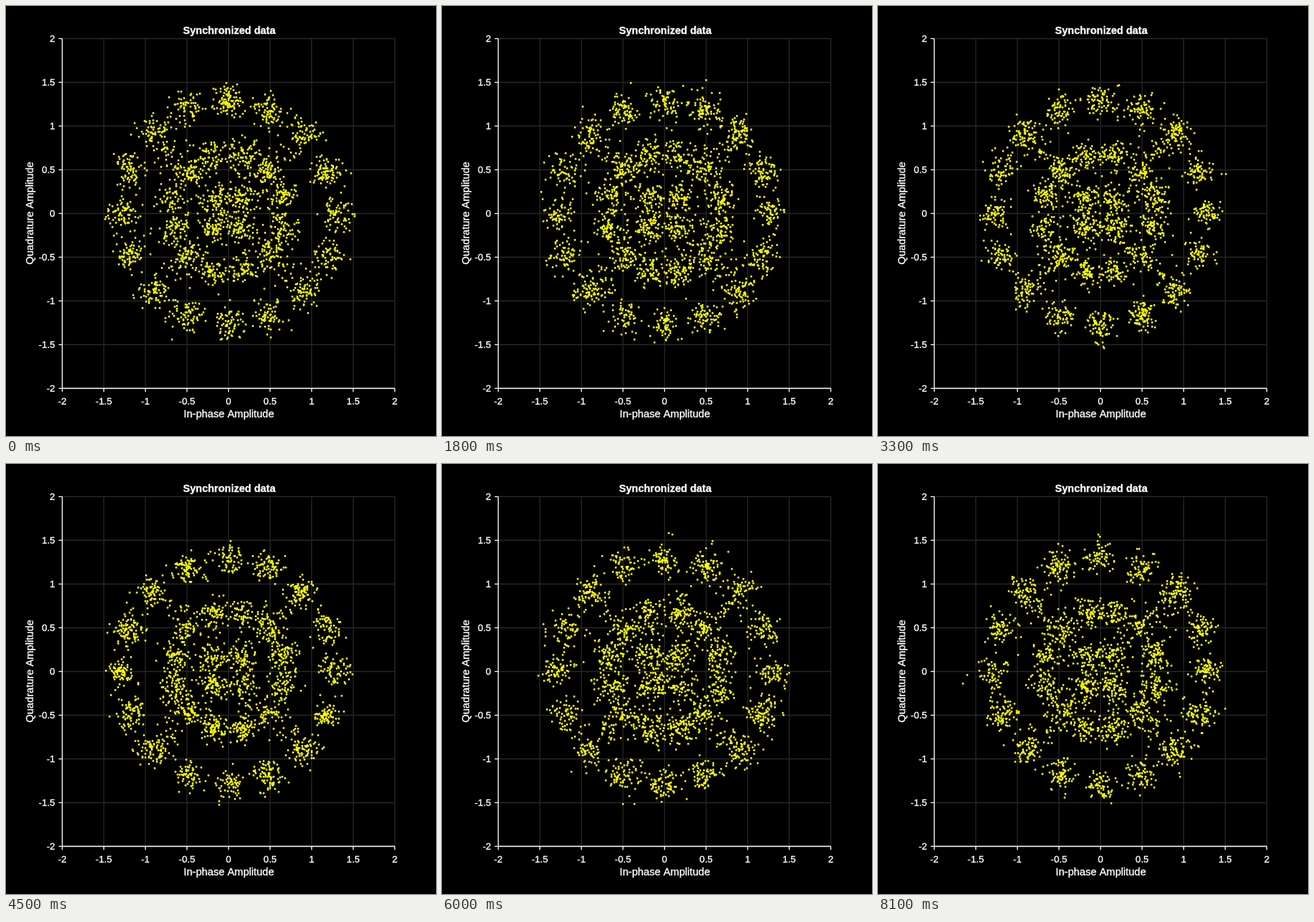
An HTML page with a canvas for the animation above (8.4 s loop, 600 by 600 pixels).

```html
<!DOCTYPE html>
<html lang="en">
<head>
<meta charset="utf-8">
<title>Synchronized data</title>
<style>
html, body { margin: 0; width: 100%; height: 100%; overflow: hidden; background: #000; }
canvas { display: block; }
</style>
</head>
<body>
<canvas id="stage" width="600" height="600"></canvas>
<script>
const ctx = document.getElementById('stage').getContext('2d');
const FRAME_MS = 300, FRAMES = 28, SYMBOLS = 2450, DOT = 1.4;
const RINGS = [[4, 0.235, 45], [12, 0.68, 15], [16, 1.28, 0]];
const toX = v => 310.4 + v * 116;
const toY = v => 289.3 - v * 122;
const snap = v => Math.floor(v) + 0.5;

const points = RINGS.flatMap(([count, radius, offset]) =>
  Array.from({ length: count }, (_, i) => {
    const angle = (offset + i * 360 / count) * Math.PI / 180;
    return [radius * Math.cos(angle), radius * Math.sin(angle)];
  }));

function seeded(seed) {
  return () => {
    seed = (seed + 0x6D2B79F5) | 0;
    let t = Math.imul(seed ^ (seed >>> 15), 1 | seed);
    t = (t + Math.imul(t ^ (t >>> 7), 61 | t)) ^ t;
    return ((t ^ (t >>> 14)) >>> 0) / 4294967296;
  };
}

function label(text, x, y, size = 13.33, align = 'center', weight = 'normal') {
  ctx.font = `${weight} ${size}px "Liberation Sans", Arial, sans-serif`;
  ctx.textAlign = align;
  ctx.fillStyle = ctx.strokeStyle = '#fff';
  ctx.lineWidth = 0.35;
  ctx.fillText(text, x, y);
  ctx.strokeText(text, x, y);
}

function line(color, x1, y1, x2, y2) {
  ctx.strokeStyle = color;
  ctx.lineWidth = 1.33;
  ctx.beginPath();
  ctx.moveTo(x1, y1);
  ctx.lineTo(x2, y2);
  ctx.stroke();
}

function drawAxes() {
  ctx.fillStyle = '#000';
  ctx.fillRect(0, 0, 600, 600);
  const left = snap(toX(-2)), right = snap(toX(2));
  const top = snap(toY(2)), bottom = snap(toY(-2));
  for (let v = -2; v <= 2; v += 0.5) {
    const x = snap(toX(v)), y = snap(toY(v));
    line('#282828', x, top, x, bottom);
    line('#282828', left, y, right, y);
  }
  for (let v = -2; v <= 2; v += 0.5) {
    const x = snap(toX(v)), y = snap(toY(v));
    line('#fff', x, bottom, x, bottom + 5);
    line('#fff', left - 5, y, left, y);
    label(v, x, 556);
    label(v, 68.5, y + 4.5, 13.33, 'right');
  }
  line('#fff', left, top, left, bottom);
  line('#fff', left, bottom, right, bottom);
  label('Synchronized data', 311.5, 39, 14.5, 'center', 'bold');
  label('In-phase Amplitude', 311, 574, 14.67);
  ctx.save();
  ctx.translate(38, 289);
  ctx.rotate(-Math.PI / 2);
  label('Quadrature Amplitude', 0, 0, 14.67);
  ctx.restore();
}

function drawSymbols(frame) {
  const random = seeded(frame * 7919 + 17);
  const spread = 0.088 + 0.012 * random();
  ctx.fillStyle = '#ff0';
  ctx.beginPath();
  for (let i = 0; i < SYMBOLS; i++) {
    let [re, im] = points[Math.floor(random() * points.length)];
    // A few samples fall between the rings along the diagonals.
    if (random() < 0.03) {
      re = random() < 0.5 ? -0.7 : 0.7;
      im = random() < 0.5 ? -0.7 : 0.7;
    }
    const size = spread * Math.sqrt(-2 * Math.log(1 - random()));
    const angle = 2 * Math.PI * random();
    const x = snap(toX(re + size * Math.cos(angle)));
    const y = snap(toY(im + size * Math.sin(angle)));
    ctx.moveTo(x + DOT, y);
    ctx.arc(x, y, DOT, 0, 2 * Math.PI);
  }
  ctx.fill();
}

let shown = -1;
function tick() {
  const frame = Math.floor(performance.now() / FRAME_MS) % FRAMES;
  if (frame !== shown) {
    shown = frame;
    drawAxes();
    drawSymbols(frame);
  }
  requestAnimationFrame(tick);
}
tick();
</script>
</body>
</html>
```
